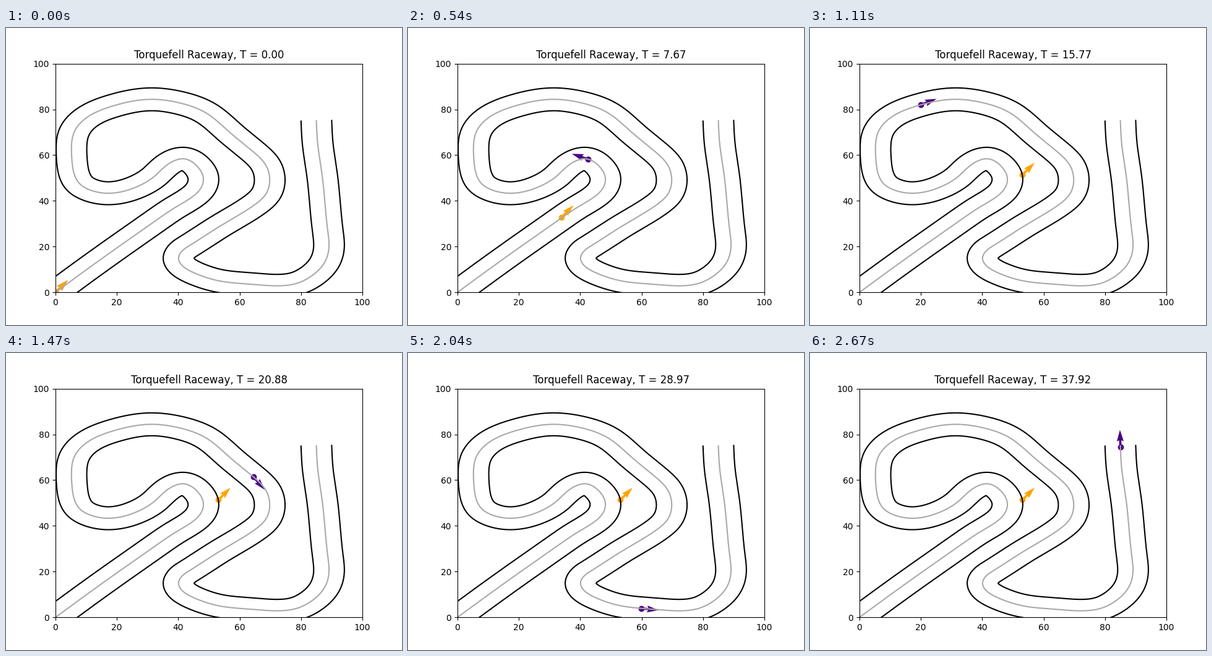
A matplotlib script for the animation above (2.7 s loop, 640 px wide and 480 px high).

```python
import numpy as np
import matplotlib.pyplot as plt
from matplotlib.animation import FuncAnimation

FRAMES, STEP_MS = 90, 30
TIME_STEP = 0.4261
HALF_WIDTH = 5
TRACK_NAME = "Torquefell Raceway"

WAYPOINTS = np.array([
    (0, 0), (11, 10.8), (22.4, 21.7), (32.5, 31.2), (39, 37.1), (44, 41.2),
    (47.2, 45.2), (48.2, 49.5), (46.4, 54.8), (41.7, 58.4), (37.1, 56.4),
    (32.3, 50.8), (26.6, 46.2), (16.4, 43.35), (11.8, 44.5), (8.1, 47.2),
    (6.1, 51.7), (5.4, 57), (5.2, 63.5), (6.2, 70.4), (9.1, 75.3),
    (13.1, 78.7), (19.2, 81.7), (31.2, 84.4), (39.9, 83), (48.6, 78.8),
    (56.5, 70.3), (64.5, 61.4), (68.2, 56.3), (69.8, 49.2), (68.4, 42.7),
    (64.6, 38), (53.9, 29.2), (44.2, 20.9), (41.2, 18), (40.1, 15),
    (41.2, 11.8), (43.5, 9.6), (46.6, 7.7), (53, 5.1), (64.1, 3.5),
    (72.6, 2.85), (78.3, 3.8), (83.6, 7.3), (87.6, 12.9), (89.1, 19.6),
    (88.7, 27), (86.9, 51), (85.4, 65.5), (85, 75)])

# Frame and rough position of the fast car; snapped to the centre line.
FAST_KEYS = [(0, 0, 0), (10, 32.5, 31.4), (25, 16.7, 43.3), (36, 15.9, 80.2),
             (49, 64.5, 61.4), (61, 44, 20.6), (76, 88.9, 16.8),
             (89, 85, 74.6)]

SLOW_STEP = 2.62
SLOW_END = np.array([53.1, 51.4])


def natural_spline(pts, count):
    """Cubic spline through pts, parametrised by chord length."""
    h = np.hypot(*np.diff(pts, axis=0).T)
    t = np.concatenate([[0], np.cumsum(h)])
    n = len(pts)
    a, b = np.eye(n), np.zeros((n, 2))
    slope = np.diff(pts, axis=0) / h[:, None]
    for i in range(1, n - 1):
        a[i, i - 1:i + 2] = h[i - 1], 2 * (h[i - 1] + h[i]), h[i]
        b[i] = 6 * (slope[i] - slope[i - 1])
    m = np.linalg.solve(a, b)
    u = np.linspace(0, t[-1], count)
    k = np.clip(np.searchsorted(t, u, side="right") - 1, 0, n - 2)
    d, hk = (u - t[k])[:, None], h[k][:, None]
    return (pts[k]
            + d * (slope[k] - hk * (2 * m[k] + m[k + 1]) / 6)
            + d ** 2 * m[k] / 2
            + d ** 3 * (m[k + 1] - m[k]) / (6 * hk))


def offset_line(line, tangent, dist):
    """Parallel curve with the parts that fold over themselves removed."""
    side = line + dist * np.column_stack([-tangent[:, 1], tangent[:, 0]])
    gap = np.hypot(side[:, None, 0] - line[None, :, 0],
                   side[:, None, 1] - line[None, :, 1]).min(axis=1)
    return side[gap > abs(dist) - 0.02]


center = natural_spline(WAYPOINTS, 1600)
tangent = np.gradient(center, axis=0)
tangent /= np.hypot(*tangent.T)[:, None]
arc = np.concatenate([[0], np.cumsum(np.hypot(*np.diff(center, axis=0).T))])

key_frames = [key[0] for key in FAST_KEYS]
key_arcs = [arc[np.argmin(np.hypot(*(center - key[1:]).T))]
            for key in FAST_KEYS]


def fast_car(frame):
    s = np.interp(frame, key_frames, key_arcs)
    pos = [np.interp(s, arc, center[:, i]) for i in (0, 1)]
    head = [np.interp(s, arc, tangent[:, i]) for i in (0, 1)]
    return pos, head


def slow_car(frame):
    """Drives straight on and stops at the edge of the track."""
    part = min(1, frame * SLOW_STEP / np.hypot(*SLOW_END))
    return part * SLOW_END, (np.sqrt(0.5), np.sqrt(0.5))


fig, ax = plt.subplots(figsize=(6.4, 4.8), dpi=100)
ax.plot(*center.T, color="darkgray")
for dist in (HALF_WIDTH, -HALF_WIDTH):
    ax.plot(*offset_line(center, tangent, dist).T, color="black")
ax.set_xlim(0, 100)
ax.set_ylim(0, 100)
title = ax.set_title("")

cars = []
for color, drive in (("indigo", fast_car), ("orange", slow_car)):
    dot = ax.scatter([0], [0], color=color)
    arrow = ax.quiver([0], [0], [1], [0], color=color, scale=18, width=0.0075)
    cars.append((drive, dot, arrow))


def update(frame):
    title.set_text(f"{TRACK_NAME}, T = {frame * TIME_STEP:.2f}")
    artists = [title]
    for drive, dot, arrow in cars:
        pos, head = drive(frame)
        dot.set_offsets([pos])
        arrow.set_offsets([pos])
        arrow.set_UVC([head[0]], [head[1]])
        artists += [dot, arrow]
    return artists


anim = FuncAnimation(fig, update, frames=FRAMES, interval=STEP_MS,
                     repeat=True, repeat_delay=0)
plt.show()
```
